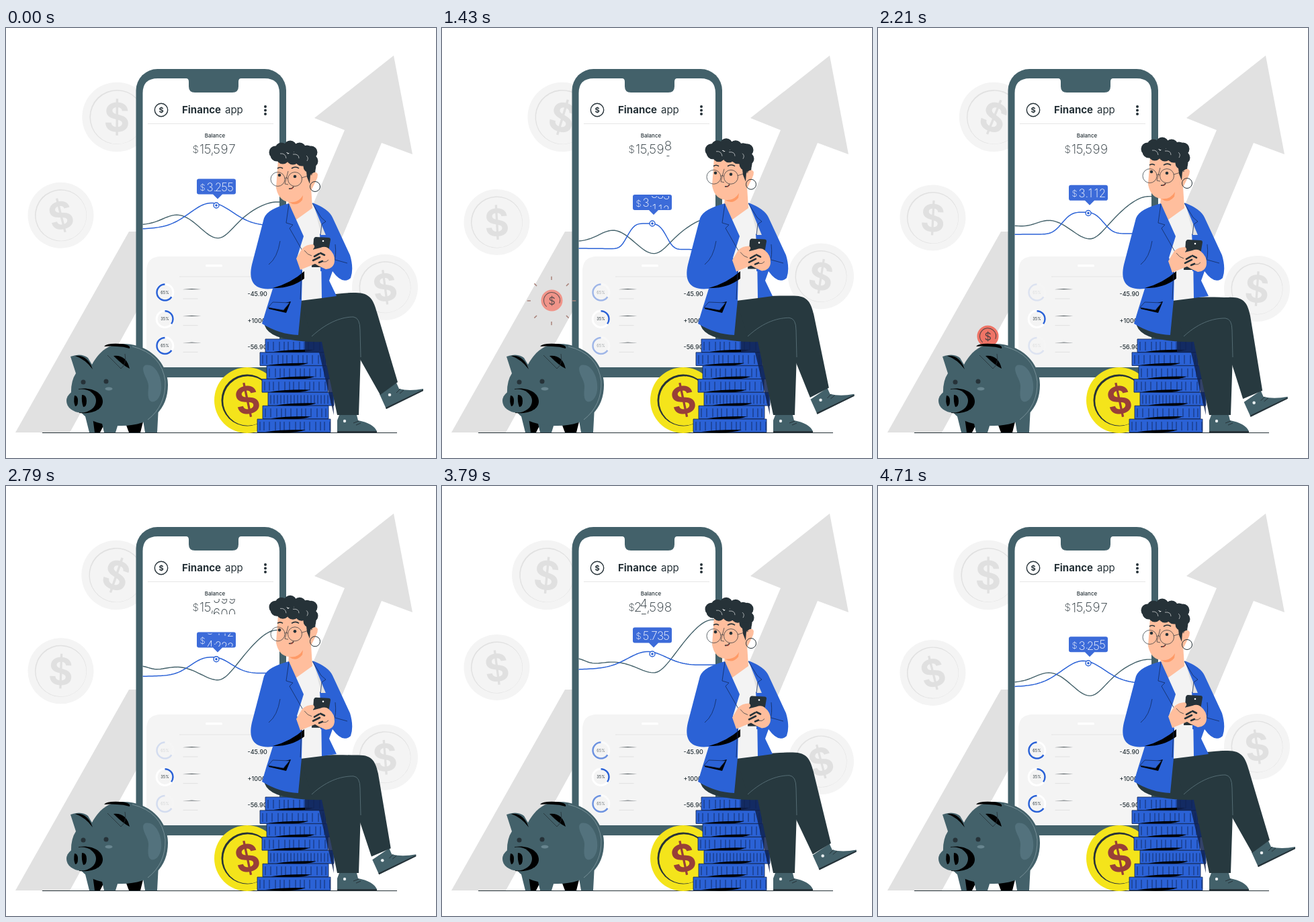
These frames come from a looping animation (640x640 px, 4.78 s). An HTML page:

```html
<!DOCTYPE html>
<html lang="en">
<head>
<meta charset="utf-8">
<title>Finance app</title>
<style>
  html, body { margin: 0; width: 100%; height: 100%; overflow: hidden; background: #fff; }
  svg { display: block; width: 100%; height: 100%; font-family: Inter, Lato, sans-serif; fill: #263238; }
  .line { fill: none; stroke: #263238; }
  .light { font-weight: 200; }
  .skin { fill: #ffbe9d; }
  .blue { fill: #2b62d6; }
  .steel { fill: #43616a; }
  .mid { text-anchor: middle; }
</style>
</head>
<body>
<svg viewBox="0 0 640 640">
  <defs>
    <g id="coin">
      <circle r="49" fill="#f4f4f4"/>
      <circle r="38.5" fill="#e1e1e1"/>
      <circle r="37.5" cx=".5" cy=".5" fill="#f4f4f4"/>
      <text class="mid" y="20.500" font-size="56" font-weight="700" fill="#e0e0e0">$</text>
    </g>
    <clipPath id="screen"><rect x="203.500" y="75" width="203.500" height="430" rx="20"/></clipPath>
    <clipPath id="balanceClip"><rect x="276" y="168" width="72" height="23"/></clipPath>
    <clipPath id="badgeClip"><rect x="284" y="2" width="58" height="19.500"/></clipPath>
  </defs>

  <path fill="#e1e1e1" d="M14 602 183 303H260L95 602ZM577 41 605 188 559 171 500 312H436L504 152 459 134Z"/>
  <use href="#coin" id="coinA"/>
  <use href="#coin" id="coinB"/>
  <use href="#coin" id="coinC"/>

  <!-- phone -->
  <rect class="steel" x="193.500" y="61" width="223.500" height="459" rx="32"/>
  <path fill="#fff" d="M226 75H268Q272 75 272 80V87Q272 96 281 96H337Q346 96 346 87V80Q346 75 350 75H385Q407 75 407 97V485Q407 505 387 505H223.500Q203.500 505 203.500 485V97Q203.500 75 226 75Z"/>
  <circle class="line" cx="231" cy="122" r="9.700" stroke-width="1.400"/>
  <text class="mid" x="231" y="126" font-size="11" font-weight="700">$</text>
  <text x="262" y="127" font-size="15" font-weight="700">Finance</text>
  <text x="326" y="127" font-size="15">app</text>
  <path class="line" stroke-width="4" stroke-linecap="round" d="M386 117h0M386 122.500h0M386 128h0"/>
  <path class="line" style="stroke:#e6e6e6" d="M211 142.500H398"/>
  <text class="mid" x="311" y="163" font-size="8" font-weight="500">Balance</text>
  <text class="light" x="277.500" y="186" font-size="15">$</text>
  <text class="light" x="304.500" y="187" font-size="19">,</text>
  <g id="balance" class="light mid" font-size="19" clip-path="url(#balanceClip)"></g>

  <g clip-path="url(#screen)">
    <path d="M209 505V362Q209 340 231 340H385Q407 340 407 362V505Z" fill="#f4f4f4"/>
    <rect x="297" y="352" width="25" height="3.500" rx="1.700" fill="#fff"/>
    <path d="M258 370H380" stroke="#e4e4e4"/>
    <g id="rows"></g>
    <path id="darkCurve" class="line" style="stroke:#43616a" stroke-width="1.400"/>
    <path id="blueCurve" class="line" style="stroke:#2b62d6" stroke-width="1.500"/>
  </g>
  <g id="dot"><circle r="4" fill="#fff" stroke="#2b62d6" stroke-width="1.400"/><circle r="1.800" class="blue"/></g>
  <g id="badge">
    <path fill="#3c6bd9" d="M287 0H339Q342 0 342 3V20Q342 23 339 23H322L315 30 308 23H287Q284 23 284 20V3Q284 0 287 0Z"/>
    <g fill="#fff" class="light">
      <text x="288.500" y="17.500" font-size="13">$</text>
      <text x="308.500" y="18" font-size="17">.</text>
      <g id="amount" class="mid" font-size="17" clip-path="url(#badgeClip)"></g>
    </g>
  </g>

  <path d="M54 602.500H582" class="line"/>

  <!-- yellow coin and stack -->
  <circle cx="359" cy="554" r="49" fill="#f4e41b"/>
  <circle cx="359" cy="554" r="38.500"/>
  <circle cx="360" cy="555" r="36.800" fill="#f4e41b"/>
  <text class="mid" transform="translate(359 554) rotate(-12)" y="20" font-size="56" font-weight="700" fill="#983f38">$</text>
  <g id="stack"></g>
  <path d="M445 463H484L488 576 466 483H445Z" fill="#10224f" opacity=".85"/>

  <!-- small coin and piggy bank -->
  <path id="rays" fill="none" stroke-width="1.500"/>
  <g id="penny">
    <circle id="pennyFace" r="16"/>
    <g id="pennyMark">
      <circle class="line" r="12" stroke-width="1" stroke-dasharray="52 24" transform="rotate(130)"/>
      <text class="mid" y="6" font-size="16">$</text>
    </g>
  </g>
  <path d="M120 572 131 602H140L150 582ZM177 586 183 602H200L205 582Z" fill="#000"/>
  <path class="steel" d="M116 570 124 602H132L128 572ZM141 580 146 602H163L168 586ZM203 578 207 602H225L227 564Z"/>
  <path class="steel" d="M97 546Q96 526 104 514L96 489Q112 483 122 491L128 501C139 481 153 470 174 470 213 470 241 498 241 531 241 567 218 592 172 592 136 592 108 582 97 546Z"/>
  <path d="M103 488Q121 486 129 508 118 493 103 488ZM160 488Q179 486 184 507 175 503 160 488Z" fill="#000"/>
  <path class="line" stroke-width=".8" d="M151 487Q159 495 171 507 180 500 177 485"/>
  <path class="line" style="stroke:#8ca2aa" stroke-width=".7" d="M188 474Q232 485 237 526 238 562 211 583"/>
  <path d="M146 474Q150 469 169 470 186 471 184 477 175 474 165 474 155 473 146 474Z" fill="#000"/>
  <circle cx="115" cy="527" r="3.500"/><circle cx="149" cy="526" r="3.500"/>
  <ellipse cx="153" cy="537" rx="5.500" ry="2.600" fill="#68858f"/>
  <path d="M207 502C222 498 233 520 231 539 229 556 215 562 212 550 210 537 215 535 209 522 204 512 202 505 207 502Z" fill="#587783" opacity=".8"/>
  <path d="M108 537C130 534 144 544 144 556 144 567 130 575 109 573Z" fill="#000"/>
  <ellipse class="steel" cx="112" cy="555" rx="22" ry="17.500"/>
  <path d="M102 547q5 0 5 8t-4 8q-3-7-1-16ZM113 546q7 0 7 9t-5 9q-3-8-2-18Z" fill="#000"/>

  <!-- person -->
  <path fill="#27393f" d="M384 438Q386 460 430 465 455 468 470 467L493 576H525L530 425 440 400Z"/>
  <path class="steel" d="M496 576H522L524 584Q546 588 552 600V602H493V584Z"/>
  <path d="M493 600H552V602H493Z"/>
  <circle cx="504" cy="585" r="2.200" fill="#e8eef0"/>
  <path class="line" d="M517 588l8 -3M521 591l7 -3"/>
  <g id="foot">
    <path class="steel" d="M556 545 581 528 585 537Q600 541 621 537L621 540 566 567Z"/>
    <path d="M565 565 621 538 621 540 566 567Z"/>
    <circle cx="571" cy="546" r="2.300" fill="#e8eef0"/>
    <path class="line" d="M581 543l6 -6M586 544l6 -5"/>
  </g>
  <path id="leg" fill="#27393f"/>
  <path id="seam" class="line" style="stroke:#607980" stroke-width=".8"/>

  <path d="M426 276 457 260 470 310 470 402 438 406Z" fill="#f3f3f3"/>
  <path class="skin" d="M421 250 454 236 456 268 431 286 420 264Z"/>
  <path class="blue" d="M421 261C400 267 388 273 384 283L366 352C360 378 370 391 397 388L387 420 381 440Q407 456 435 457L440 405 441 361 433 342 443 310Z"/>
  <path class="blue" d="M456 260Q480 269 486 282L512 338Q518 358 513 372 501 383 486 362L481 376 492 399 470 402 469 340 467 306 485 330Z"/>
  <path class="blue" d="M468 308H492V362H468Z"/>
  <path d="M397 387Q424 388 444 373V362Q424 380 397 387Z" fill="#000"/>
  <path d="M391 415 424 407 417 424 391 418Z" fill="#000"/>
  <path class="blue" d="M397 408 422 409 413 420 390 416Z"/>
  <path class="line" style="stroke:#142b5e" stroke-width=".8" d="M421 262 417 290 427 293 422 298 442 333M456 261 469 282 476 288 470 292 468 308M408 317Q404 342 391 352M440 362 438 404M397 408 422 409 413 420 390 416ZM490 322Q492 340 488 348M490 345 508 350"/>

  <g id="hands">
    <path d="M461 311 480 312Q483 312 483 315L476 356H455L458 314Q459 311 461 311Z"/>
    <circle cx="472" cy="317" r="1.300" fill="#fff"/>
    <path class="skin" d="M432 343 441 328Q447 322 457 322 462 325 456 330L468 327Q475 324 480 328 490 336 489 347 488 358 476 359L465 354 460 351 438 360Z"/>
    <path class="line" stroke-width="2.600" stroke-linecap="round" d="M459 340l7 -4M457 346l10 -5M466 349l5 -2M468 335l6 3"/>
    <path class="line" stroke-width=".7" d="M444 331Q449 338 455 339M472 348Q477 349 480 345"/>
  </g>

  <g id="head">
    <path class="skin" d="M405 196 402 238Q406 258 422 259L441 254 455 240 462 226Q465 216 457 215L455 198Z"/>
    <path d="M421 259Q435 261 442 249L441 256Q432 267 421 259Z" fill="#ff9a66"/>
    <path class="line" stroke-width="19" stroke-linecap="round" d="M401 185h0M410 180h0M423 177h0M437 180h0M448 184h0M454 185h0M455 198h0M452 206h0M403 189h0M412 193h0M427 194h0M440 196h0"/>
    <path d="M446 205 461 206 460 217 453 218 452 232 448 222Z"/>
    <path class="line" style="stroke:#fff" stroke-width=".6" d="M408 187q8 -1 9 7M427 188q9 -1 9 6M447 190q4 3 1 8"/>
    <path class="skin" d="M453 219Q461 211 464 218 464 228 454 231Z"/>
    <circle class="line" cx="460" cy="236" r="7.500"/>
    <g class="line" stroke-width=".7">
      <circle cx="404.500" cy="225" r="10.500"/><circle cx="430" cy="225" r="10.500"/>
      <path d="M415 224q2 -3 4.500 0M440 223 456 218M420 213 415 232 420 233"/>
      <path stroke-width="1.600" d="M404 209q4 -3 8 0M425 209q6 -4 11 0M421 239q5 1 7 -3"/>
    </g>
    <circle cx="407" cy="219" r="2.300"/><circle cx="430" cy="221" r="2.300"/>
    <path d="M421 239q5 1 7 -4l-2 5Z" fill="#c34a3b"/>
  </g>
</svg>
<script>
const LOOP = 4780, FRAMES = 67, STEP = LOOP / FRAMES;
const $ = id => document.getElementById(id);
const set = (id, name, value) => $(id).setAttribute(name, value);
const clamp = x => Math.max(0, Math.min(1, x));
const ease = x => x * x * (3 - 2 * x);
const between = (t, start, end) => clamp((t - start) / (end - start));
const mix = (a, b, p) => a + (b - a) * p;
const hump = (x, centre, width, power = 2) => Math.exp(-(Math.abs((x - centre) / width) ** power));

// one sine per loop, highest at `peak`
const wave = (t, mean, size, peak) => mean + size * Math.cos(2 * Math.PI * (t - peak) / LOOP);

// eases from the resting value to the low one, on to the high one and back
function swing(t, rest, low, high) {
  const down = mix(rest, low, ease(between(t, 0, 1400)));
  const up = mix(down, high, ease(between(t, 1430, 3300)));
  return mix(up, rest, ease(between(t, 3790, LOOP)));
}

function plot(id, f) {
  let d = 'M';
  for (let x = 203; x <= 408; x += 3) d += `${x} ${f(x)} `;
  set(id, 'd', d);
}

function drawChart(t) {
  const base = swing(t, 299, 328, 273), height = swing(t, 36, 38, 23), width = swing(t, 45, 32, 40);
  const power = swing(t, 2, 4, 2), tilt = swing(t, 5, -2, 7);
  plot('blueCurve', x => base - height * hump(x, 305, width, power) - tilt * (x - 203) / 204);

  const left = swing(t, 293, 318, 267), lead = swing(t, 0, 0, 10), bump = swing(t, 15, 17, 5);
  const dip = swing(t, 20, 18, 11), rise = swing(t, 34, 36, 68);
  plot('darkCurve', x => left - lead * hump(x, 200, 18) - bump * hump(x, 255, 30)
    + dip * hump(x, 315, 28) - rise * ease(between(x, 315, 403)));

  set('dot', 'transform', `translate(313 ${swing(t, 264, 291, 250)})`);
  set('badge', 'transform', `translate(0 ${swing(t, 224.5, 248, 210.5)})`);
}

// rolling digits; each change is [start, end, new value]
function reel(id, xs, y, first, changes) {
  $(id).innerHTML = xs.map(x => `<text x="${x}"></text>`.repeat(2)).join('');
  const cells = [...$(id).children];
  const put = (cell, text, shift) => { cell.textContent = text; cell.setAttribute('y', y + shift); };
  return t => xs.forEach((_, i) => {
    let from = first, to = first, p = 1;
    for (const [start, end, value] of changes) {
      if (t < start) break;
      from = to;
      to = value;
      p = ease(between(t, start + 30 * i, end));
    }
    const rolling = from[i] !== to[i] && p < 1;
    put(cells[2 * i], to[i], rolling ? 22 * (1 - p) : 0);
    put(cells[2 * i + 1], rolling ? from[i] : '', -22 * p);
  });
}

const rollBalance = reel('balance', [291.5, 300, 313.5, 325, 336.5], 187, '15597', [
  [250, 650, '15598'], [1150, 1780, '15599'], [2420, 3010, '15600'],
  [3150, 3600, '24598'], [3620, 4100, '25598'], [4250, 4760, '15597']]);
const rollAmount = reel('amount', [303.5, 316, 325, 334], 18, '3255', [
  [450, 1040, '3333'], [1150, 1620, '3112'], [2450, 3000, '4223'],
  [3200, 3650, '5735'], [4350, LOOP, '3255']]);

$('rows').innerHTML = [['65%', '-45.90'], ['35%', '+1000'], ['65%', '-56.90']].map(([share, sum], i) => {
  const arc = 2 * Math.PI * 12 * parseInt(share) / 100, fades = i !== 1;
  return `<g transform="translate(236.5 ${393.5 + 39.7 * i})">
    <g class="${fades ? 'fade' : ''}">
      <circle r="12.300" fill="none" stroke="#fff" stroke-width="3"/>
      <circle r="12" fill="none" stroke="#2b62d6" stroke-width="2.500" stroke-dasharray="${arc} 99"
        transform="rotate(-90) scale(1 ${fades ? -1 : 1})"/>
      <text class="mid" y="2.200" font-size="5.600">${share}</text>
    </g>
    <path d="M27 -4.500 40 -5.200 54 -4.500 40 -4.200Z"/>
    <path class="line" style="stroke:#d8d8d8" stroke-width=".7" d="M27 -4H50M27 9.500H49"/>
    <text x="123" y="5.500" font-size="9" font-weight="500">${sum}</text></g>`;
}).join('');

$('stack').innerHTML = [386, 378, 388, 381, 390, 382, 374].map((x, i) => {
  const y = 463 + 19.85 * i, w = i === 6 ? 109 : 98;
  let ridges = '';
  for (let k = 4; k < w; k += 5 + (k * 7 + i * 3) % 5) ridges += `M${x + k} ${y + 4}v13`;
  return `<rect class="blue" x="${x}" y="${y}" width="${w}" height="19.850"/>
    <path d="M${x} ${y}h${w}v19.500h-${w}z${ridges}" class="line" style="stroke:#0f2350" stroke-width=".8"/>
    <path d="M${x + 12} ${y + 19}q28 -4 60 -3q-20 7 -60 3z" fill="#000"/>`;
}).join('');

function drawPenny(t) {
  const q = (t - 500) / 1100, fall = Math.max(0, (t - 1750) / 600), tint = between(t, 900, 1600);
  set('penny', 'visibility', t > 450 && t < 2350 ? 'visible' : 'hidden');
  set('penny', 'transform', `translate(163.5 ${405.5 + 90 * fall ** 2}) scale(${between(t, 450, 880)})`);
  set('pennyMark', 'opacity', mix(0.4, 0.8, tint));
  $('pennyFace').style.fill = `color-mix(in srgb, #ee7466 ${100 * tint}%, #f5f5f5)`;
  let d = '';
  if (q > 0 && q < 1) for (let k = 0; k < 8; k++) {
    const a = k * Math.PI / 4, at = r => `${163 + r * Math.cos(a)} ${406 + r * Math.sin(a)}`;
    d += `M${at(15 + 19 * q)}L${at(32 + 5 * q)}`;
  }
  set('rays', 'd', d);
  $('rays').style.stroke = `color-mix(in srgb, #8d5a50 ${100 * tint}%, #fff)`;
}

// u runs from 0 (leg raised) to 1 (leg lowered)
function drawPerson(u) {
  set('head', 'transform', `translate(0 ${-5 * u})`);
  set('hands', 'transform', `translate(0 ${4 * u})`);
  set('foot', 'transform', `translate(${-11.5 * u} ${12 * u})`);
  set('leg', 'd', `M438 ${404 + 2 * u}C470 398 500 ${394 + 7 * u} ${518 + 4 * u} ${394 + 7 * u}
    C${542 + 4 * u} ${393 + 7 * u} ${547 + 3 * u} ${405 + 6 * u} ${552 + 2 * u} ${423 + 5 * u}
    L${583 - 11 * u} ${527 + 13 * u} ${557 - 14 * u} ${546 + 6 * u}
    527 ${493 + 8 * u} 527 445C525 425 490 430 455 460Z`);
  set('seam', 'd', `M455 459C480 436 502 ${430 + 2 * u} 517 ${430 + 2 * u}Q527 ${431 + 2 * u} 527 450L528 490`);
}

function draw(t) {
  const place = (id, x, y, turn, size = 1) =>
    set(id, 'transform', `translate(${x} ${y}) rotate(${turn}) scale(${size})`);
  place('coinA', wave(t, 167.5, 11.7, 1358), 132.5, wave(t, 11, 11, 2200), 1.055);
  place('coinB', 81.5, wave(t, 279.5, 9.7, 1250), wave(t, -5.5, 8.5, 2400));
  place('coinC', 564, wave(t, 389.5, -22.5, 1070), wave(t, -3, 12, 1500));

  drawChart(t);
  rollBalance(t);
  rollAmount(t);
  drawPenny(t);

  const u = wave(t, 0.5, -0.5, 0);
  document.querySelectorAll('.fade').forEach(g => g.setAttribute('opacity', 1 - 0.9 * u));
  drawPerson(u);
}

const begin = performance.now();
function tick() {
  const time = performance.now() - begin;
  draw(Math.floor(time / STEP + 0.1) % FRAMES * STEP);
  requestAnimationFrame(tick);
}
tick();
</script>
</body>
</html>
```
